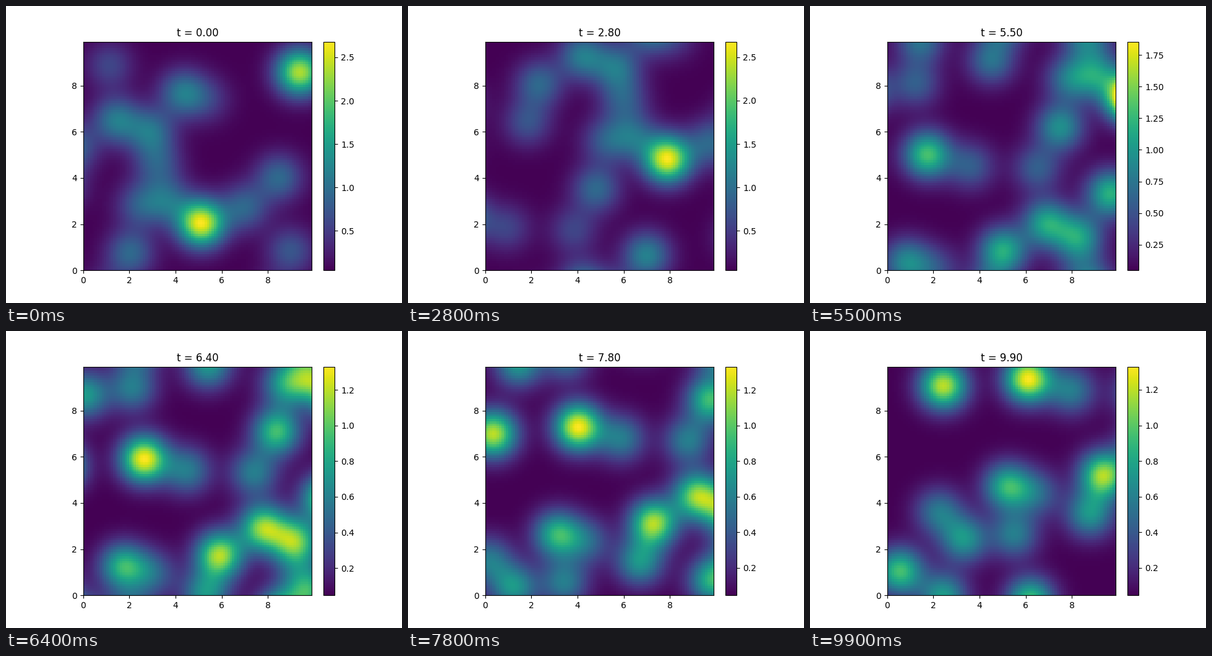
Animation of 640 by 480 pixels, one loop 10000 ms. Source, as a matplotlib script:

```python
import numpy as np
import matplotlib.pyplot as plt
from matplotlib.animation import FuncAnimation

N = 100        # cells per side and frames per loop
STEP = 0.1     # cell size and time step
SIGMA = 0.72   # hill radius
BASE = 0.045   # level of the voids between hills
FLOOR = 0.03

# Hilltops (x, y) at t = 0, grouped by height
HILLS = {
    2.68: [(5.1, 2.0)],
    2.36: [(9.4, 8.6)],
    1.33: [(-3.8, -0.5)],
    1.2: [(4.3, 7.7), (1.4, 6.5), (2.9, 6.0), (3.6, 3.0), (4.2, -2.2),
          (1.4, -3.5), (2.8, -4.1), (-0.5, -4.7), (-7.5, -0.8)],
    0.95: [(-0.5, 5.3), (7.0, 2.7), (2.4, 2.8), (3.4, -6.3), (-9.4, -8.9),
           (-3.7, -10.2), (2.0, 0.7), (-4.7, -5.2), (8.5, 4.0),
           (3.2, 4.6), (2.1, -7.2)],
    0.75: [(9.0, 0.8), (-1.0, 3.6), (-1.1, -6.4), (-6.6, -7.5),
           (-4.1, 4.5), (-6.4, 2.3), (-7.5, -10), (5.4, 7.4),
           (2.9, -5.3), (8.3, -1.4)],
    0.6: [(1.1, 8.9), (1.0, -1.1), (-7.7, -6.3), (-3.4, -5.5),
          (-1.9, -1.0), (-4.3, 2.6), (-4.4, -7.3)],
}


def bumps(x, y, cx, cy):
    d2 = (x[..., None] - cx) ** 2 + (y[..., None] - cy) ** 2
    return np.exp(-d2 / (2 * SIGMA ** 2))


def build_field():
    """Sum of Gaussian hills, weighted so that each top has its height."""
    tops = [(x, y, h) for h, points in HILLS.items() for x, y in points]
    cx, cy, height = np.array(tops).T
    weights = np.linalg.solve(bumps(cx, cy, cx, cy), height - BASE)
    axis = (np.arange(2 * N - 1) - (N - 1)) * STEP
    x, y = np.meshgrid(axis, axis)
    return np.maximum(BASE + bumps(x, y, cx, cy) @ weights, FLOOR)


field = build_field()


def window(i):
    """The part of the field in view after drifting i cells up and right."""
    lo = N - 1 - i
    return field[lo:lo + N, lo:lo + N]


W, H = 640, 480
SIDE = 0.77 * H
LEFT = 328 - 0.55 * SIDE

fig = plt.figure(figsize=(W / 100, H / 100), dpi=100)
ax = fig.add_axes([LEFT / W, 0.11, SIDE / W, 0.77])
cax = fig.add_axes([(LEFT + 1.05 * SIDE) / W, 0.11, 0.05 * SIDE / W, 0.77])

span = (N - 1) * STEP
im = ax.imshow(window(0), origin="lower", extent=(0, span, 0, span),
               cmap="viridis", interpolation="nearest")
ax.set_xticks(range(0, 10, 2))
ax.set_yticks(range(0, 10, 2))
title = ax.set_title("t = 0.00")
fig.colorbar(im, cax=cax)


def update(i):
    view = window(i)
    im.set_data(view)
    im.set_clim(view.min(), view.max())
    title.set_text(f"t = {i * STEP:.2f}")
    return im, title


anim = FuncAnimation(fig, update, frames=N, interval=100, repeat=True,
                     repeat_delay=0, blit=False)
plt.show()
```
